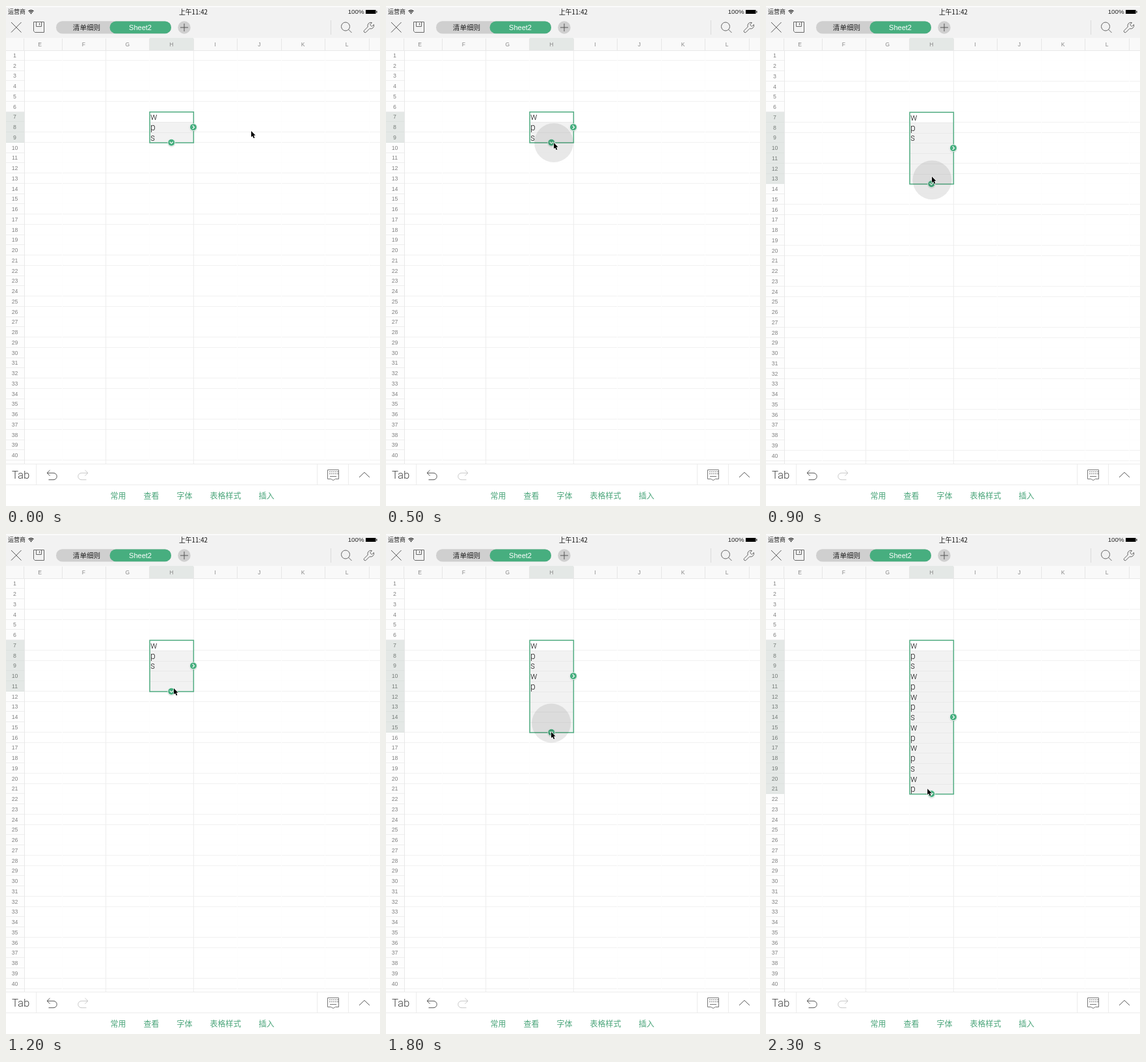
These frames come from a looping animation (575x768 px, 2400 ms). An HTML page with a canvas:

```html
<!DOCTYPE html>
<html lang="zh-CN">
<head>
<meta charset="utf-8">
<style>
  html, body { margin: 0; width: 100%; height: 100%; overflow: hidden; background: #fff; }
  canvas { display: block; width: 575px; height: 768px; }
</style>
</head>
<body>
<canvas id="stage" width="575" height="768"></canvas>
<script>
const ctx = document.getElementById('stage').getContext('2d');
const LOOP = 2400, STEP = 100;
const GREEN = '#47ae7f', MARKED = '#e4e8e6';
const TOP = 68, ROW = 15.75, LEFT = 28, BOTTOM = 703, FIRST = 7;
const COLS = Array.from({ length: 8 }, (_, i) => Math.floor(86 + i * 67.45));
const CJK = '"Noto Sans CJK SC", "Noto Sans CJK", sans-serif';
const LATIN = '"Liberation Sans", Arial, sans-serif';
const LIGHT = 'Roboto, "Liberation Sans", sans-serif';

// pointer path: [time, x, y]
const PATH = [
  [0, 377, 192], [200, 240, 212], [300, 240, 212], [450, 258, 210], [500, 258, 210],
  [700, 257, 257], [850, 256, 274], [900, 255, 262], [1200, 258, 237],
  [1600, 255, 243], [1700, 255, 243], [1800, 254, 304], [1870, 249, 392], [LOOP, 248, 391]
];
const LAG = 22, SIDE_LAG = 45;

function pointer(t) {
  const i = PATH.findIndex(p => p[0] > t);
  const [t0, x0, y0] = PATH[i - 1], [t1, x1, y1] = PATH[i];
  const k = (t - t0) / (t1 - t0);
  return [x0 + (x1 - x0) * k, y0 + (y1 - y0) * k];
}

// last selected row follows the pointer
function lastRow(t) {
  const y = pointer(Math.max(t, 0))[1];
  return Math.max(9, Math.ceil((y - 72) / ROW));
}

const filledRow = t => t < 1400 ? 9 : t < 2200 ? 11 : 21;
const touching = t => (t >= 500 && t < 1200) || (t >= 1800 && t < 2100);

function rect(x, y, w, h, color) {
  ctx.fillStyle = color;
  ctx.fillRect(x, y, w, h);
}

function disc(x, y, r, color) {
  ctx.fillStyle = color;
  ctx.beginPath();
  ctx.arc(x, y, r, 0, Math.PI * 2);
  ctx.fill();
}

function pill(x, y, w, h, color) {
  ctx.fillStyle = color;
  ctx.beginPath();
  ctx.roundRect(x, y, w, h, h / 2);
  ctx.fill();
}

function stroke(d, color = '#555', width = 1) {
  ctx.strokeStyle = color;
  ctx.lineWidth = width;
  ctx.stroke(new Path2D(d));
}

function text(s, x, y, font, color, align = 'left') {
  ctx.font = font;
  ctx.fillStyle = color;
  ctx.textAlign = align;
  ctx.fillText(s, x, y);
}

function topBar() {
  rect(0, 0, 575, 49, '#f2f2f2');
  rect(0, 0, 575, 2, '#fafafa');
  text('运营商', 3, 12.3, '9px ' + CJK, '#222');
  text('上午11:42', 288, 12.5, '9.8px ' + CJK, '#111', 'center');
  text('100%', 550.5, 12.3, '9.7px ' + LATIN, '#222', 'right');
  stroke('M34.5 8Q38.5 4.6 42.5 8M36 9.8Q38.5 7.6 41 9.8', '#222', 1.2);
  disc(38.5, 11.3, 1, '#222');
  rect(553, 6, 15.5, 6, '#000');
  rect(569.3, 7.6, 1.2, 2.8, '#000');

  stroke('M8 25L23.5 40.5M23.5 25L8 40.5');
  stroke('M42.5 24.5H58.5V40.5H44.5L42.5 38.5ZM46.5 24.5V31.5H54.5V24.5M51.5 26V29.5', '#666');

  pill(77, 23.3, 177, 19.2, '#cfcfcf');
  pill(159.5, 23.5, 94.5, 18.8, GREEN);
  text('清单细则', 124, 36.8, '10.6px ' + CJK, '#222', 'center');
  text('Sheet2', 206.5, 36.8, '11px ' + LATIN, '#fff', 'center');
  disc(274, 33, 9.7, '#cfcfcf');
  stroke('M268 33H280M274 27V39');

  rect(499, 22, 1, 22, '#dcdcdc');
  stroke('M528.5 31.5A6.5 6.5 0 1 1 515.5 31.5A6.5 6.5 0 1 1 528.5 31.5M526.7 36.2L531.5 41', '#666');
  stroke('M562.5 25.5A5 5 0 0 0 556.3 32L550.8 37.5A1.8 1.8 0 0 0 553.5 40.2L559 34.7A5 5 0 0 0 565.5 28.5L562.3 31.5L559.7 28.8Z', '#666');
}

function bottomBar() {
  rect(0, BOTTOM, 575, 65, '#fff');
  rect(0, BOTTOM, 575, 1, '#ececec');
  rect(0, 735, 575, 1, '#ececec');
  for (const x of [46, 478, 526]) rect(x, 704, 1, 31, '#ececec');
  text('Tab', 9, 726, '300 16.8px ' + LIGHT, '#444');
  const undo = 'M67.5 713L63 717.3L67.5 721.5M63 717.3H73A5.2 5.2 0 0 1 73 727.7H65.5';
  stroke(undo);
  ctx.save();
  ctx.translate(189, 0);
  ctx.scale(-1, 1);
  stroke(undo, '#c8c8c8');
  ctx.restore();
  stroke('M494.5 712.5H511.5V726.5H506.5L503 728.5L499.5 726.5H494.5Z', '#777');
  for (const y of [715, 718]) {
    for (let x = 497; x < 510; x += 3) rect(x, y, 2, 1, '#777');
  }
  rect(498, 722, 10, 1, '#777');
  stroke('M543 724L551 716.3L559 724');
  let x = 160.5;
  for (const s of ['常用', '查看', '字体', '表格样式', '插入']) {
    text(s, x, 756.7, '12px ' + CJK, '#4aa57a');
    x += s.length * 12 + 27;
  }
}

function gridLines(shift) {
  const phase = shift ? 1 : 0;
  for (let n = 1; n <= 40; n++) {
    const y = Math.round(TOP + shift + n * ROW) - 1;
    const k = (n + phase) % 4;
    rect(LEFT, y, 547, 1, k < 2 ? '#f1f1f1' : '#fdfdfd');
    if (k === 2) for (const x of COLS) rect(x, y, 1, 1, '#ebebeb');
  }
  COLS.forEach((x, i) => {
    rect(x, 69, 1, BOTTOM - 69, i === 1 || i === 3 ? '#ededed' : '#fdfdfd');
  });
}

function headers(last, shift) {
  rect(0, 49, 575, 20, '#f9f9f9');
  rect(221, 49, 67, 19, MARKED);
  rect(0, 68, 575, 1, '#e8e8e8');
  for (const x of [27, ...COLS]) rect(x, 50, 1, 18, '#e6e6e6');
  [...'EFGHIJKL'].forEach((c, i) => {
    text(c, 52 + i * 67.45, 62, '8.5px ' + LATIN, '#888', 'center');
  });

  rect(0, 69, LEFT, BOTTOM - 69, '#fdfdfd');
  rect(0, TOP + shift + (FIRST - 1) * ROW, LEFT, (last - FIRST + 1) * ROW, MARKED);
  for (let n = 1; n <= 41; n++) {
    const y = TOP + shift + n * ROW;
    const on = n >= FIRST && n <= last;
    rect(0, Math.round(y) - 1, LEFT, 1, on ? '#dde2df' : '#ededed');
    text(n, 13.5, y - ROW / 2 + 3, '8.7px ' + LATIN, on ? '#747b77' : '#808080', 'center');
  }
  rect(LEFT, 69, 1, BOTTOM - 69, '#e8e8e8');
}

function handle(x, y, turn) {
  disc(x, y + 0.5, 6.4, 'rgba(0,0,0,.12)');
  disc(x, y, 6, '#f4faf7');
  disc(x, y, 5, GREEN);
  ctx.save();
  ctx.translate(x, y);
  ctx.rotate(turn);
  stroke('M-1.2 -2.6L1.5 0L-1.2 2.6', '#fff', 1.2);
  ctx.restore();
}

function selection(t, last, shift) {
  const bottom = n => TOP + shift + n * ROW;
  const y0 = bottom(FIRST - 1), y1 = bottom(last);
  rect(221, y0, 67, y1 - y0, '#f2f2f2');
  rect(221, y0, 67, ROW, '#fff');
  for (let n = FIRST; n < last; n++) rect(221, Math.round(bottom(n)), 67, 1, '#e9e9e9');
  for (let n = FIRST; n <= filledRow(t); n++) {
    text('wpswp'[(n - FIRST) % 5], 222, bottom(n) - 2.9, '300 14px ' + LIGHT, '#222');
  }
  ctx.strokeStyle = '#4fab80';
  ctx.lineWidth = 1.5;
  ctx.strokeRect(221, y0 + 0.3, 67.4, y1 - y0);
  handle(288, (y0 + bottom(lastRow(t - SIDE_LAG))) / 2, 0);
  handle(254.3, y1, Math.PI / 2);
}

function cursor(x, y) {
  const arrow = new Path2D('M0 0V10.6L2.4 8.4L4.2 12.6L6.1 11.8L4.3 7.7H7.5Z');
  ctx.save();
  ctx.translate(x, y);
  ctx.scale(0.88, 0.88);
  ctx.lineWidth = 1.4;
  ctx.lineJoin = 'round';
  ctx.strokeStyle = '#fff';
  ctx.stroke(arrow);
  ctx.fillStyle = '#000';
  ctx.fill(arrow);
  ctx.restore();
}

function draw(t) {
  const last = lastRow(t);
  const shift = t < 600 ? 0 : 0.5;
  rect(0, 0, 575, 768, '#fff');
  gridLines(shift);
  headers(last, shift);
  selection(t, last, shift);
  topBar();
  bottomBar();
  if (touching(t)) disc(...pointer(t - LAG), 30, 'rgba(0,0,0,.09)');
  cursor(...pointer(t));
}

const start = performance.now();
function tick() {
  const t = (performance.now() - start) % LOOP;
  draw(Math.floor(t / STEP) * STEP);
  requestAnimationFrame(tick);
}
tick();
</script>
</body>
</html>
```
